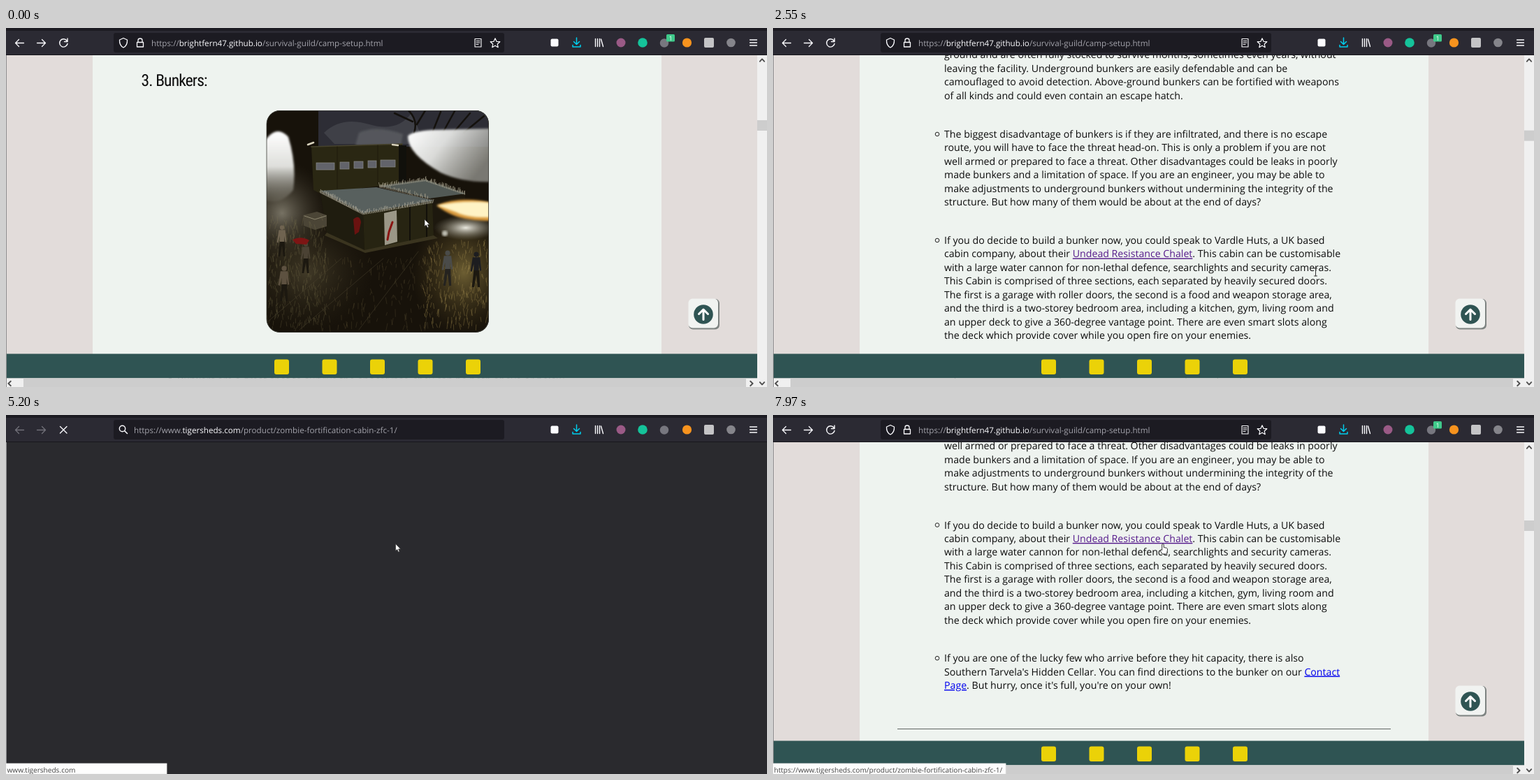
Animation, 1089 px wide and 514 px high, one loop 8000 ms. Source, as an HTML page:

```html
<!DOCTYPE html>
<html lang="en">
<head>
<meta charset="utf-8">
<title>Camp setup</title>
<style>
html, body { margin: 0; width: 100%; height: 100%; overflow: hidden; background: #2b2a33; }
svg { display: block; width: 100%; height: 100%; text-rendering: geometricPrecision; }
.open { font-family: "Open Sans", "Noto Sans", sans-serif; }
.arial { font-family: "Liberation Sans", Arial, sans-serif; }
.head { font-family: "Roboto Condensed", Roboto, "Open Sans", sans-serif; font-stretch: 75%; letter-spacing: -.85px; }
.black { font-family: Inter, "DejaVu Sans", sans-serif; font-weight: 900; letter-spacing: 1.2px; }
.b { font-weight: 700; }
.mid { text-anchor: middle; }
.link { fill: #551a8b; text-decoration: underline; }
.new { fill: #00e; }
.line { fill: none; stroke-linecap: round; stroke-linejoin: round; }
</style>
</head>
<body>
<script>
const rect = (x, y, w, h, fill, more = '') =>
  `<rect x="${x}" y="${y}" width="${w}" height="${h}" fill="${fill}" ${more}/>`;
const circle = (x, y, r, fill, more = '') => `<circle cx="${x}" cy="${y}" r="${r}" fill="${fill}" ${more}/>`;
const oval = (x, y, rx, ry, fill, more = '') =>
  `<ellipse cx="${x}" cy="${y}" rx="${rx}" ry="${ry}" fill="${fill}" ${more}/>`;
const shape = (d, fill, more = '') => `<path d="${d}" fill="${fill}" ${more}/>`;
const line = (d, stroke, w = 1.3, more = '') =>
  `<path class="line" d="${d}" stroke="${stroke}" stroke-width="${w}" ${more}/>`;
const text = (x, y, s, size, fill, cls = '') =>
  `<text x="${x}" y="${y}" font-size="${size}" fill="${fill}" class="${cls}">${s}</text>`;
const span = (s, cls, more = '') => `<tspan class="${cls}" ${more}>${s}</tspan>`;
const group = (id, body, more = '') => `<g id="${id}" ${more}>${body}</g>`;

let seed = 7;
const rnd = () => (seed = seed * 16807 % 2147483647) / 2147483647;

// ---------- picture of the bunker ----------
function blades(n, x, y, w, h, len) {
  let d = '';
  for (let i = 0; i < n; i++) {
    const a = x + rnd() * w, b = y + rnd() * h;
    d += `M${a.toFixed(1)} ${b.toFixed(1)}l${(rnd() * 5 - 2.5).toFixed(1)} ${(-len * (.5 + rnd())).toFixed(1)}`;
  }
  return d;
}

// tufts scattered along a straight edge
function fringe(n, x1, y1, x2, y2) {
  let d = '';
  for (let i = 0; i < n; i++) {
    const k = i / n;
    d += `M${(x1 + (x2 - x1) * k).toFixed(1)} ${(y1 + (y2 - y1) * k + 2).toFixed(1)}l${(rnd() * 3 - 1.5).toFixed(1)} ${(-2 - rnd() * 5).toFixed(1)}`;
  }
  return d;
}
const man = (x, y, h, coat, legs = '#1c1810') => `<g transform="translate(${x} ${y}) scale(${h / 50})">` +
  circle(0, 4, 3.4, coat) + shape('M-5 8H5L7 26 5 27 3.500 17V27H-3.500V17L-6 28-8 27Z', coat) +
  shape('M-3.500 26H4L5 49H2L0 32-3 49H-6Z', legs) + '</g>';
const pane = (x, y, w) => rect(x, y, w, 10, '#62636a', 'stroke="#8a8a86" stroke-width=".7"');
const soft = 'filter="url(#soft)"';

const picture = `<g clip-path="url(#frame)">` +
  rect(373, 118, 318, 318, '#17120a') +
  shape('M447 118H690V170H447Z', '#2d2d35') +
  shape('M455 150Q480 126 520 138T580 122L600 166H470Z', '#3f4047') +
  shape('M505 150Q530 138 568 152L565 168H500Z', '#55575c', soft) +
  line('M584 150Q590 132 576 118M588 138 600 118M582 134 556 122M610 150 622 120M625 150 642 119M640 150 664 122M655 150 684 126', '#14110d', 2.5) +
  oval(395, 265, 70, 75, 'url(#haze)') + oval(430, 350, 95, 85, 'url(#fieldL)') + oval(655, 350, 75, 90, 'url(#field)') +
  shape('M375 156Q389 140 404 156Q416 195 411 232Q392 256 366 245V165Z', 'url(#lampL)', soft) +
  shape('M575 155Q580 148 610 146L696 144V220Q655 222 622 207Q575 180 575 155Z', 'url(#lampR)', soft) +
  shape('M437 170 567 166 572 222 448 236 440 232Z', '#2a2713') +
  line('M437 170 567 166', '#46422c', 1.5) + line('M474 170V230M532 168V224', '#1e1b0d', 1) +
  pane(444, 193, 26) + pane(478, 192, 13) + pane(498, 191, 13) + pane(518, 190, 12) + pane(536, 189, 21) +
  line('M432 167 440 164M553 167 561 168', '#d8d2bd', 2.5) + shape('M562 168H573V222H562Z', '#11100b') +
  shape('M605 243 657 236V262L612 290Z', '#1d180e') +
  shape('M535 226 600 217 658 237 606 244Z', '#525955') +
  line(fringe(40, 535, 226, 600, 217) + fringe(40, 600, 217, 658, 237) + fringe(40, 535, 226, 606, 244), '#a5a08c', .7) +
  shape('M450 235 511 264 513 320 459 293Z', '#1f1c0f') +
  shape('M511 264 610 248 612 298 513 320Z', '#272412') +
  line('M578 253V306M602 249V300', '#12100a', 2) +
  shape('M450 233 530 228 612 247 511 265Z', '#58605e') +
  line(fringe(60, 450, 234, 511, 265) + fringe(70, 511, 265, 612, 248), '#a29f90', .8) +
  shape('M541 265 559 261 560 306 542 311Z', '#9b9787') +
  line('M553 278 548 292 546 303', '#8a1512', 3) +
  shape('M497 274Q506 266 508 278L505 292 499 296Z', '#6a1210') +
  shape('M425 268 445 263 459 268V284L442 289 426 283Z', '#4b4536') + line('M427 269 442 274 458 269', '#8d866f', 1) +
  shape('M459 293 513 318 612 297 618 301 514 322 456 297Z', '#3a341f') +
  oval(658, 286, 46, 18, 'url(#glow)') + circle(628, 294, 4, '#bdbcb0', soft) +
  shape('M616 254Q650 240 694 250V276Q660 276 640 268Q626 262 616 254Z', '#d99a3c', soft) +
  shape('M617 254Q655 246 692 250V271Q660 272 645 264Z', '#fff3c4', soft) +
  line(blades(230, 598, 310, 92, 124, 7), '#a58f50', .7, 'opacity=".5"') +
  line(blades(300, 374, 275, 85, 160, 7), '#8a8058', .6, 'opacity=".4"') +
  line(blades(160, 440, 335, 170, 100, 7), '#5a4f33', .7, 'opacity=".5"') +
  line('M375 420 480 330M420 432 540 330M505 432 590 320', '#4a432f', 1, 'opacity=".5"') +
  man(395, 282, 46, '#6f6350') + man(429, 306, 46, '#4b4234') + man(398, 340, 52, '#5d5140') +
  shape('M410 303Q422 297 434 304L430 310 415 309Z', '#7d1514') +
  man(632, 318, 52, '#4a4b49', '#25231f') + man(673, 320, 52, '#1d1d20') +
  `</g>` + rect(373, 118.5, 317.5, 317, 'none', 'rx="19" stroke="#3a3a36" stroke-width=".8"');

// ---------- camp page ----------
const product = 'Undead Resistance Chalet', code = '(URC-1)';
const paras = [
  [509, ['Bunkers are a great spot to survive the apocalypse, they can be both above or below',
    'ground and are often fully stocked to survive months, sometimes even years, without',
    'leaving the facility. Underground bunkers are easily defendable and can be',
    'camouflaged to avoid detection. Above-ground bunkers can be fortified with weapons',
    'of all kinds and could even contain an escape hatch.']],
  [642, ['The biggest disadvantage of bunkers is if they are infiltrated, and there is no escape',
    'route, you will have to face the threat head-on. This is only a problem if you are not',
    'well armed or prepared to face a threat. Other disadvantages could be leaks in poorly',
    'made bunkers and a limitation of space. If you are an engineer, you may be able to',
    'make adjustments to underground bunkers without undermining the integrity of the',
    'structure. But how many of them would be about at the end of days?']],
  [794, ['If you do decide to build a bunker now, you could speak to Vardle Huts, a UK based',
    `cabin company, about their ${span(product, 'link')}. This cabin can be customisable`,
    'with a large water cannon for non-lethal defence, searchlights and security cameras.',
    'This Cabin is comprised of three sections, each separated by heavily secured doors.',
    'The first is a garage with roller doors, the second is a food and weapon storage area,',
    'and the third is a two-storey bedroom area, including a kitchen, gym, living room and',
    'an upper deck to give a 360-degree vantage point. There are even smart slots along',
    'the deck which provide cover while you open fire on your enemies.']],
  [984.7, ['If you are one of the lucky few who arrive before they hit capacity, there is also',
    `Southern Tarvela's Hidden Cellar. You can find directions to the bunker on our ${span('Contact', 'link new')}`,
    `${span('Page', 'link new')}. But hurry, once it's full, you're on your own!`]]
];
const article = paras.map(([y, rows]) =>
  circle(235, y - 5, 2.8, 'none', 'stroke="#222"') +
  rows.map((s, i) => text(245, y + i * 19.47, s, 14.17, '#0c0c0c', 'open')).join('')).join('');

const chevron = (x, y, turn) =>
  line('M-3.2 1.8 0-1.6 3.2 1.8', '#505050', 1.9, `transform="translate(${x} ${y}) rotate(${turn})"`);

const camp = rect(0, 39, 1089, 475, '#e2dcda') + rect(124, 39, 814, 428, '#eef3ef') +
  group('scroll', text(193.5, 83, '3. Bunkers:', 23.5, '#0c0c0c', 'head') + picture + article +
    rect(178, 1080.5, 706, 1, '#5f6563')) +
  rect(977, 388, 44, 43.5, '#7d8381', 'rx="6"') + rect(976.5, 387.5, 42.5, 42, '#f1f3f1', 'rx="6"') +
  circle(998, 410, 13.8, '#2f5453') + line('M998 417.5V403.5M991.5 409.5 998 403 1004.5 409.5', '#fff', 3) +
  rect(0, 466.5, 1075, 35, '#2f5453') +
  [394.5, 463, 531.5, 600, 668.5].map(x => rect(x - 10.5, 474.5, 21, 21.5, '#ebd208', 'rx="3"')).join('') +
  rect(1075, 39, 14, 475, '#f0f0f0') + rect(0, 501.5, 1075, 12.5, '#f0f0f0') + rect(25, 501.5, 1034, 12.5, '#cdcdcd') +
  rect(1075, 132, 14, 15, '#cdcdcd', 'id="thumb"') +
  chevron(1082, 46, 0) + chevron(1082, 509, 180) + chevron(5, 509, -90) + chevron(1067, 509, 90);

// ---------- shop page ----------
const orange = '#ff6f00';
const links = [[603, 'Help'], [664, 'Brochure'], [748, 'Tracking'], [829, 'Contact'], [905, 'Callback'], [987, '0 items']];
const tabs = [[266, 'Garden', 'Sheds'], [370, 'Faster Delivery', 'Sheds'], [467, 'Log', 'Cabins'], [553, 'Summer', 'Houses'],
  [648, 'Garden', 'Storage'], [752, 'Wooden', 'Playhouses'], [864, 'Pet Houses &amp;', 'Other'], [978, 'Beware Of', 'Imitations']];
const notice = [span('Unfortunately this product is currently unavailable for new orders.', 'b') + ' Due',
  'to unprecedented levels of demand during the lockdown period we are',
  'prioritising building and fulfilling for existing orders. Product details are',
  'shown to browse for information and for existing customers to refer to if',
  'required. We apologise for any inconvenience this may cause.'];
const icons = circle(590.5, 93, 8, 'none', `stroke="${orange}" stroke-width="1.2"`) +
  text(590.5, 97.5, '?', 12, orange, 'mid') +
  line('M652 88Q648 85.5 645.5 87V99Q649 98 652 100Q655 98 658.500 99V87Q655 85.5 652 88V100', orange, 1.1) +
  circle(735.5, 93, 6, 'none', `stroke="${orange}" stroke-width="1.1"`) + circle(735.5, 93, 1.6, orange) +
  line('M735.5 85V88M735.5 98V101M727.5 93H731M740 93H743.5', orange, 1.1) +
  line('M809 87H825V100H809ZM809 87 817 94.500 825 87M809 100 815 93M825 100 819 93', orange, 1.1) +
  line('M887 87 889.500 86 892 90 890 92Q891.500 96 895.500 97.500L897 95.500 900 98 898.500 100.500Q894 101 889.500 96T887 87Z', orange, 1.1) +
  line('M967.500 89H981.500V101H967.500ZM971 91V87Q971 84.500 974.500 84.500T978 87V91', orange, 1.1);

const shopBody = rect(1, 39, 1074, 24, '#191614') +
  text(486, 55, 'Enjoy A Quality CedarKlip Shed - 20 Year Guarantee - Delivered In 2 Weeks Or Less!', 11.2, '#fff', 'b mid') +
  rect(722, 42.5, 87, 17, '#f9530b') + text(765.5, 55, 'View Buildings', 11.2, '#fff', 'mid') +
  rect(37.5, 65, 172.5, 109.5, orange) + shape('M59 174H95L77 184Z', orange) +
  text(244, 99.5, 'Quick product search', 14, '#666c72') + rect(237, 110, 194, 2, '#333') + icons +
  links.map(([x, s]) => text(x, 98, s, 11.2, '#222')).join('') +
  rect(210, 126, 710, 47.5, '#efefef') + rect(309.5, 126, 120.5, 47.5, '#333') + rect(920, 126, 116.5, 47.5, '#e53935') +
  tabs.map(([x, a, b], i) => {
    const fill = i == 1 || i == 7 ? '#fff' : '#111';
    return text(x, 145.5, a, 11.2, fill, 'b mid') + text(x, 162.5, b, 11.2, fill, 'b mid');
  }).join('') +
  text(50, 196, 'Home', 10.5, '#222') + text(92, 196, `${product} ${code}`, 10.5, orange) +
  text(103, 232, `${product} ${code}`, 14, '#333') +
  text(550.5, 249, 'Undead Resistance', 36.5, '#333', 'black') + text(550.5, 291, `Chalet ${code}`, 36.5, '#333', 'black') +
  text(563, 320, 'Average Customer Rating (16 Reviews)', 11.2, orange) +
  text(550.5, 359.5, "Exclusive - The world's first and only certified* Zombie Proof Log Cabin.", 14, '#333') +
  text(550.5, 376, 'The zombie apocalypse is coming..', 14, '#333') +
  notice.map((s, i) => text(550.5, 413.5 + i * 16.85, s, 14, '#8b0000')).join('') +
  text(550.5, 522.5, 'From ' + span('£69995', '', `fill="${orange}"`), 20.3, '#333', 'b') +
  shape('M77.500 393.500 81 397 75.500 402.500 81 408 77.500 411.500 68.500 402.500Z', '#777') +
  shape('M492.500 393.500 489 397 494.500 402.500 489 408 492.500 411.500 501.500 402.500Z', '#777');
const shop = rect(0, 39, 1089, 475, '#fff') + group('shopBody', shopBody, 'class="arial"') +
  rect(1075, 39, 14, 475, '#f0f0f0') + rect(1075, 54, 14, 280, '#cdcdcd') + chevron(1082, 46, 0) + chevron(1082, 509, 180);

// ---------- browser bar ----------
const ink = '#fbfbfe';
const bar = rect(0, 0, 1089, 39, '#2b2a33') + rect(0, 0, 1089, 4, '#1c1b22') + rect(0, 38, 1089, 1, '#17161c') +
  rect(154, 7, 559, 28, '#1c1b22', 'rx="3"') +
  group('arrows', line('M25.500 21.500H13.500M18.500 16.500 13.500 21.500 18.500 26.500', 'currentColor') +
    line('M44.500 21.500H56.500M51.500 16.500 56.500 21.500 51.500 26.500', 'currentColor')) +
  group('reload', line('M87 18A5.700 5.700 0 1 0 88 22.500M88 15V19.500H83.500', ink, 1.4)) +
  group('stop', line('M77.500 16.500 87 26M87 16.500 77.500 26', ink, 1.4)) +
  group('secure', line('M168 14.500 173.500 17Q174 25 168 28Q162 25 162.500 17Z', ink) +
    line('M189 20V17.500Q189 15 192 15T195 17.500V20M187.500 20.500H196.500V27H187.500Z', ink)) +
  group('search', circle(166.5, 19.5, 4.2, 'none', `stroke="${ink}" stroke-width="1.4"`) + line('M169.700 22.700 173.500 26.500', ink, 1.5)) +
  group('reader', line('M671 15.500H680V27H671ZM673 18.500H678M673 21H678M673 23.500H676', ink, 1.1)) +
  group('star', line('M700 14.800 702 19.300 706.800 19.700 703.200 23 704.200 27.700 700 25.200 695.800 27.700 696.800 23 693.200 19.700 698 19.300Z', ink, 1.2)) +
  text(0, 26, '', 11.65, '#a2a2aa', 'open').replace('<text', '<text id="url"') +
  rect(779.5, 15.5, 11, 11, ink, 'rx="2"') +
  line('M816.500 14V23M812.500 19.500 816.500 23.500 820.500 19.500M811 24.500V27H822V24.500', '#00cfee', 1.5) +
  line('M843.500 15.500V26.500M846.500 15.500V26.500M849.500 15.500V26.500M851.500 16 854.500 26.500', ink, 1.4) +
  circle(880, 21, 6.5, '#9a5a86') + circle(911, 21, 6.8, '#15c39a') + circle(942, 21.5, 6.2, '#77777f') +
  group('badge', rect(945, 9, 12, 10.5, 'currentColor', 'rx="1.5"') + text(951, 17.5, '1', 9, '#fff', 'open mid')) +
  circle(974.5, 21, 6.6, '#f7931e') + rect(999, 14, 14, 14, '#c4c4c6', 'rx="2"') + circle(1037.5, 21, 6.3, '#85858b') +
  line('M1064.500 17H1074.500M1064.500 21H1074.500M1064.500 25H1074.500', ink);

const status = rect(0, 499, 333, 15, '#fdfdfd', 'id="tip" stroke="#ebebeb" stroke-width=".8"') +
  '<text id="tipText" x="1.500" y="512" font-size="10.1" fill="#444" class="open"></text>';

const pointers =
  group('arrow', shape('M0 0V10L2.300 8 4 11.700 5.700 11 4.100 7.400H7.200Z', '#fff', 'stroke="#333" stroke-width=".7"')) +
  group('beam', line('M-2-5.500H2M0-5.500V5.500M-2 5.500H2', '#333', 1)) +
  group('hand', shape('M-1.300.800Q0-.800 1.200.800V5L5.500 6Q6.800 6.500 6.500 8.500L5.500 14.500H-1L-4 9.500Q-3.500 7.500-1.300 9Z', '#fff', 'stroke="#222" stroke-width=".9"'));

const stops = (id, list, type = 'radial', more = '') => `<${type}Gradient id="${id}" ${more}>` +
  list.map(([o, c, a]) => `<stop offset="${o}" stop-color="${c}" stop-opacity="${a}"/>`).join('') + `</${type}Gradient>`;
document.body.insertAdjacentHTML('afterbegin', `<svg viewBox="0 0 1089 514" preserveAspectRatio="none"><defs>
  <clipPath id="frame">${rect(373, 118, 318, 318, '#000', 'rx="19"')}</clipPath>
  <filter id="soft"><feGaussianBlur stdDeviation="1.5"/></filter>` +
  stops('lampL', [[0, '#fff', 1], [.5, '#f4f5f2', .9], [1, '#b5b4a8', .1]], 'linear', 'x2="0" y2="1"') +
  stops('lampR', [[0, '#fff', 1], [.45, '#e4e5e3', .95], [1, '#9a9a94', .75]], 'linear', 'y2=".5"') +
  stops('haze', [[0, '#8f8a7a', .8], [1, '#3a3426', 0]]) + stops('glow', [[0, '#f4f3ea', .95], [1, '#8a8674', 0]]) +
  stops('field', [[0, '#8a7840', .75], [1, '#4a3c1c', 0]]) + stops('fieldL', [[0, '#4f4731', .75], [1, '#2a2416', 0]]) +
  `</defs>` + group('camp', camp) + group('blank', rect(0, 39, 1089, 475, '#2a2a2e')) + group('shop', shop) +
  bar + rect(0, 39, 1, 475, '#8d8d8f') + group('status', status) + group('pointer', pointers) + `</svg>`);

// ---------- timeline: [ms, value...] held until the next step ----------
const shopUrl = ['https://www.', 'tigersheds.com', '/product/zombie-fortification-cabin-zfc-1/'];
const campUrl = ['https://', 'brightfern47.github.io', '/survival-guild/camp-setup.html'];
const scrolls = [[0, 0], [1770, 25], [1890, 150], [2030, 302], [2150, 385], [2280, 440], [2430, 474], [2550, 485],
  [2830, 500], [2950, 545], [3100, 590], [3250, 622], [3370, 629], [3490, 631], [7450, 631.5]];
const moves = [[0, 'arrow', 599, 274], [660, 'arrow', 640, 260], [780, 'arrow', 690, 240], [930, 'arrow', 738, 290],
  [1050, 'arrow', 773, 332], [1200, 'arrow', 775, 347], [2430, 'beam', 776.5, 349.5], [3640, 'arrow', 775, 347],
  [3920, 'arrow', 716, 312], [4040, 'beam', 635.5, 260], [4190, 'beam', 570, 196], [4340, 'hand', 558, 184.5],
  [4910, 'arrow', 557.5, 184.5], [7450, 'hand', 558, 184.5]];
const views = [[0, 'camp'], [4910, 'blank'], [5480, 'white'], [5600, 'shop'], [7450, 'camp']];
const tips = [[0, '', 0], [4490, shopUrl.join(''), .6], [4640, shopUrl.join(''), 1], [4780, '', 0],
  [5200, 'www.tigersheds.com', 1], [6720, '', 0], [7820, shopUrl.join(''), .6], [7970, shopUrl.join(''), 1]];
const badges = [[0, '#3fc98a'], [4910, ''], [5720, '#77777f'], [7450, '#3fc98a']];
const loads = [[0, 0], [4780, 1], [7200, 0]];

const $ = id => document.getElementById(id);
const show = (id, on) => $(id).style.display = on ? '' : 'none';
const at = (track, t) => track.findLast(s => s[0] <= t).slice(1);

function draw(t) {
  const [view] = at(views, t), [y] = at(scrolls, t), [kind, px, py] = at(moves, t);
  const [tip, alpha] = at(tips, t), [badge] = at(badges, t), [busy] = at(loads, t);
  const home = view == 'camp', blank = view == 'blank', store = !home && !blank;
  show('camp', home); show('blank', blank); show('shop', store); show('shopBody', view == 'shop');
  $('scroll').setAttribute('transform', `translate(0 ${-y})`);
  $('thumb').setAttribute('y', 132 + y * 19 / 631);

  show('secure', !blank); show('search', blank); show('reader', home); show('star', !blank);
  show('stop', busy); show('reload', !busy);
  $('arrows').style.color = home ? ink : '#72717a';
  show('badge', badge); $('badge').style.color = badge;
  const [pre, host, path] = home ? campUrl : shopUrl;
  $('url').setAttribute('x', blank ? 183 : 208);
  $('url').innerHTML = pre + span(host, '', `fill="${ink}"`) + path;

  show('status', tip);
  $('tip').setAttribute('width', tip.length > 20 ? 333 : 230);
  $('tipText').textContent = tip;
  $('tipText').style.opacity = alpha;

  for (const id of ['arrow', 'beam', 'hand']) show(id, id == kind);
  $('pointer').setAttribute('transform', `translate(${px} ${py})`);
}

const start = performance.now();
(function tick() {
  draw((performance.now() - start) % 8000);
  requestAnimationFrame(tick);
})();
</script>
</body>
</html>
```
